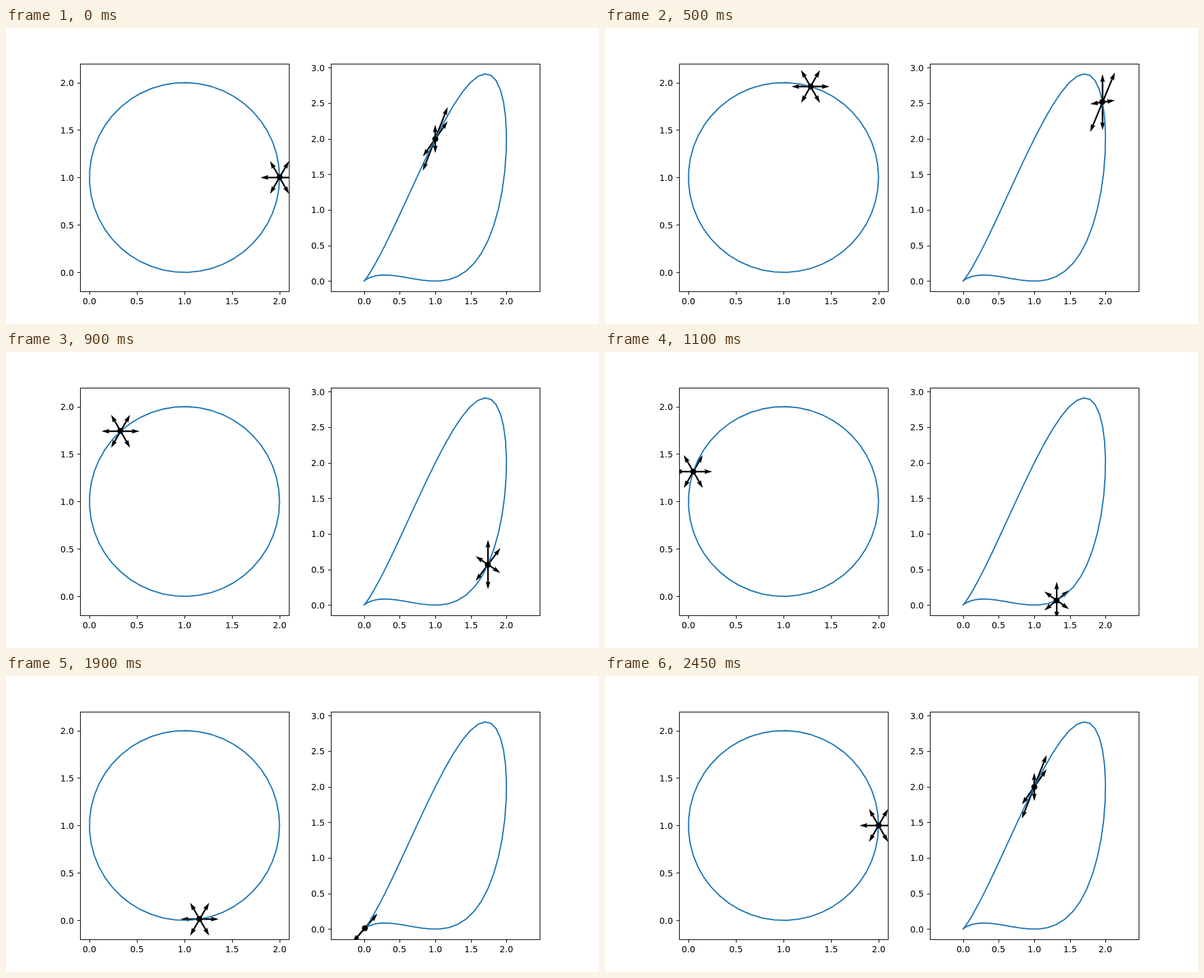
Animation, 960 px wide and 480 px high, one loop 2.5 s. Source, as an HTML page:

```html
<!DOCTYPE html>
<html lang="en">
<head>
<meta charset="utf-8">
<title>Circle and its image under a map</title>
<style>
  html, body { margin: 0; width: 100%; height: 100%; overflow: hidden; background: #fff; }
  svg { display: block; }
  .curve { fill: none; stroke: #1f77b4; stroke-width: 2.083; stroke-linecap: square; stroke-linejoin: round; }
  .axis { fill: none; stroke: #000; stroke-width: 1.111; }
  text { font: 13.889px "DejaVu Sans", sans-serif; }
</style>
</head>
<body>
<svg id="stage" width="960" height="480" viewBox="0 0 960 480"></svg>
<script>
const STEPS = 50, STEP_MS = 50, ARROW = 0.2;
const TOP = 57.6, BOTTOM = 427.2, WIDTH = 744 / 2.2;
const UNIT = 0.0075 * WIDTH; // arrow shaft width
const stage = document.getElementById('stage');

function add(parent, tag, attrs, text) {
  const el = document.createElementNS('http://www.w3.org/2000/svg', tag);
  for (const key in attrs) el.setAttribute(key, attrs[key]);
  if (text) el.textContent = text;
  return parent.appendChild(el);
}

const snap = v => Math.floor(v + 0.5) + 0.5;
const polyline = pts => 'M' + pts.map(p => p.map(v => v.toFixed(3)).join(' ')).join('L');

const circle = Array.from({ length: STEPS }, (_, i) => {
  const t = 2 * Math.PI * i / (STEPS - 1);
  return [1 + Math.cos(t), 1 + Math.sin(t)];
});
const spokes = Array.from({ length: 6 }, (_, k) =>
  [ARROW * Math.cos(k * Math.PI / 3), ARROW * Math.sin(k * Math.PI / 3)]);

const identity = { at: p => p, push: (p, d) => d };
const product = {
  at: ([x, y]) => [y, x * y],
  push: ([x, y], [dx, dy]) => [dy, y * dx + x * dy]
};

// Arrow outline of fixed head size; short arrows shrink as a whole.
function arrow([cx, cy], [dx, dy]) {
  const len = Math.hypot(dx, dy) / UNIT, angle = Math.atan2(dy, dx);
  let shape;
  if (len < 1) {
    shape = [0, 1, 2, 3, 4, 5].map(k =>
      [0.5 * Math.cos(k * Math.PI / 3), 0.5 * Math.sin(k * Math.PI / 3)]);
  } else {
    const full = Math.max(len, 5), k = Math.min(1, len / 5);
    shape = [[0, .5], [full - 4.5, .5], [full - 5, 1.5], [full, 0],
             [full - 5, -1.5], [full - 4.5, -.5], [0, -.5]].map(p => p.map(v => v * k));
  }
  const c = Math.cos(angle) * UNIT, s = Math.sin(angle) * UNIT;
  return polyline(shape.map(([x, y]) => [cx + x * c - y * s, cy + x * s + y * c])) + 'Z';
}

function makePlot(left, map, xMax, yMax) {
  const pts = circle.map(map.at);
  const [bx, by] = [0, 1].map(k => {
    const vals = pts.map(p => p[k]), lo = Math.min(...vals), hi = Math.max(...vals);
    return { mid: (lo + hi) / 2, span: (hi - lo) * 1.1 };
  });
  const scale = Math.min(WIDTH / bx.span, (BOTTOM - TOP) / by.span);
  const px = x => left + WIDTH / 2 + (x - bx.mid) * scale;
  const py = y => (TOP + BOTTOM) / 2 - (y - by.mid) * scale;
  const toPx = ([x, y]) => [px(x), py(y)];

  const x0 = snap(left), x1 = snap(left + WIDTH), y0 = snap(TOP), y1 = snap(BOTTOM);
  const clip = add(stage, 'clipPath', { id: 'clip' + Math.round(left) });
  add(clip, 'rect', { x: x0 - .5, y: y0 - .5, width: x1 - x0 + .5, height: y1 - y0 + .5 });
  const inner = add(stage, 'g', { 'clip-path': `url(#${clip.id})` });
  const arrows = spokes.map(() => add(inner, 'path', {}));
  add(inner, 'path', { class: 'curve', d: polyline(pts.map(toPx)) });
  const dot = add(inner, 'circle', { r: 4.861 });

  add(stage, 'rect', { class: 'axis', x: x0, y: y0, width: x1 - x0, height: y1 - y0 });
  for (let v = 0; v <= xMax; v += 0.5) {
    add(stage, 'path', { class: 'axis', d: `M${snap(px(v))} ${y1}v5` });
    add(stage, 'text', { x: Math.round(px(v) - 11.05), y: 448 }, v.toFixed(1));
  }
  for (let v = 0; v <= yMax; v += 0.5) {
    add(stage, 'path', { class: 'axis', d: `M${x0} ${snap(py(v))}h-5` });
    add(stage, 'text', { x: Math.round(left - 31.81), y: Math.round(py(v) + 5.27) }, v.toFixed(1));
  }

  return i => {
    const centre = toPx(pts[i]);
    spokes.forEach((d, k) => {
      const [dx, dy] = map.push(circle[i], d);
      arrows[k].setAttribute('d', arrow(centre, [dx * scale, -dy * scale]));
    });
    dot.setAttribute('cx', Math.round(centre[0]));
    dot.setAttribute('cy', Math.round(centre[1]));
  };
}

const plots = [makePlot(120, identity, 2, 2), makePlot(864 - WIDTH, product, 2, 3)];

function draw() {
  const i = Math.floor(performance.now() / STEP_MS) % STEPS;
  plots.forEach(show => show(i));
  requestAnimationFrame(draw);
}
draw();
</script>
</body>
</html>
```
